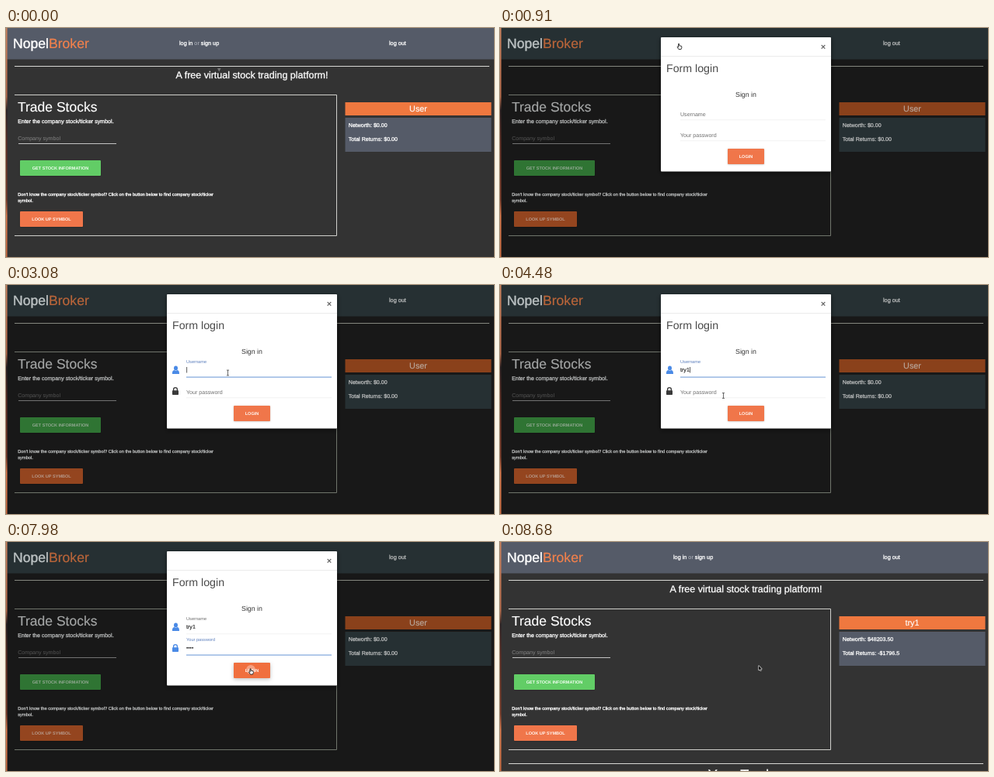
These frames come from a looping animation (628 px wide and 296 px high, 8.75 s). An HTML page with a canvas:

```html
<!DOCTYPE html>
<html lang="en">
<head>
<meta charset="utf-8">
<title>Stock trading login</title>
<style>
html, body { margin: 0; width: 100%; height: 100%; overflow: hidden; background: #333; }
canvas { display: block; width: 628px; height: 296px; }
</style>
</head>
<body>
<canvas id="stage"></canvas>
<script>
const LOOP = 8750, W = 628, H = 296;
const FONT = '"Liberation Sans", Arial, sans-serif';
const USER = 'try1';
const canvas = document.getElementById('stage');
const dpr = window.devicePixelRatio || 1;
canvas.width = W * dpr;
canvas.height = H * dpr;
const ctx = canvas.getContext('2d');
ctx.textRendering = 'geometricPrecision';

const lerp = (a, b, k) => a + (b - a) * k;
const ramp = (t, from, to) => Math.min(1, Math.max(0, (t - from) / (to - from)));
const easeOut = k => 1 - (1 - k) ** 2;
const easeInOut = k => k * k * (3 - 2 * k);

function mix(a, b, k) {
  const part = (hex, i) => parseInt(hex.substr(1 + i * 2, 2), 16);
  const rgb = [0, 1, 2].map(i => Math.round(lerp(part(a, i), part(b, i), k)));
  return `rgb(${rgb})`;
}

function box(x, y, w, h, color) {
  ctx.fillStyle = color;
  ctx.fillRect(x, y, w, h);
}

function text(str, x, y, size, color, { align = 'left', weight = 400, heavy = 0 } = {}) {
  ctx.font = `${weight} ${size}px ${FONT}`;
  ctx.textAlign = align;
  ctx.fillStyle = ctx.strokeStyle = color;
  ctx.fillText(str, x, y);
  if (heavy) {
    ctx.lineWidth = heavy;
    ctx.lineJoin = 'round';
    ctx.strokeText(str, x, y);
  }
  return ctx.measureText(str).width;
}

function button(label, x, y, w, color, textColor, lift = 0) {
  ctx.save();
  ctx.shadowColor = 'rgba(0,0,0,.25)';
  ctx.shadowBlur = 2 + lift * 3;
  ctx.shadowOffsetY = 0.5 + lift;
  ctx.fillStyle = color;
  ctx.beginPath();
  ctx.roundRect(x, y, w, 20, 1);
  ctx.fill();
  ctx.restore();
  text(label, x + w / 2, y + 12, 5.55, textColor, { align: 'center', weight: 700 });
}

// Page; dim runs from 0 (clear) to 1 (behind the dialog)
function drawPage(dim, loggedIn) {
  const tone = (a, b) => mix(a, b, dim);
  const ink = tone('#ffffff', '#b8baba');
  const orange = tone('#ef783f', '#8a411b');
  const slate = tone('#555b68', '#263033');
  const rule = tone('#d8d8d4', '#85877f');
  const small = { heavy: 0.3 };

  box(0, 0, W, H, tone('#333333', '#181818'));
  box(1, 0, W, 40.5, slate);
  const edge = ctx.createLinearGradient(0, 0, 0, H);
  edge.addColorStop(0, '#c9805c');
  edge.addColorStop(0.3, '#b4694a');
  edge.addColorStop(0.36, '#2a2022');
  edge.addColorStop(0.5, '#5c2c22');
  edge.addColorStop(0.75, '#7a3c2a');
  edge.addColorStop(0.82, '#d9794c');
  edge.addColorStop(1, '#c4683f');
  box(0, 0, 1.6, H, edge);

  const first = text('Nopel', 9, 26, 17.6, tone('#ffffff', '#bcc2c3'), { heavy: 0.4 });
  text('Broker', 9 + first, 26, 17.6, tone('#f2814c', '#b9653a'), { heavy: 0.2 });
  let x = 223;
  x += text('log in ', x, 22, 7.25, ink, small);
  x += text('or ', x, 22, 7.25, tone('#b9bdc6', '#7e8587'));
  text('sign up', x, 22, 7.25, ink, small);
  text('log out', 493, 22, 7.25, ink, small);

  box(11, 49, 611, 1, rule);
  text('A free virtual stock trading platform!', 316.5, 65, 12.5, ink, { align: 'center', heavy: 0.3 });

  // card, open on the left
  ctx.strokeStyle = tone('#d0d0cc', '#70756c');
  ctx.lineWidth = 1;
  ctx.beginPath();
  ctx.moveTo(11, 86.5);
  ctx.lineTo(425.5, 86.5);
  ctx.lineTo(425.5, 268.5);
  ctx.lineTo(11, 268.5);
  ctx.stroke();
  text('Trade Stocks', 15, 108, 17.5, tone('#ffffff', '#a4a6a6'), { heavy: 0.15 });
  text('Enter the company stock/ticker symbol.', 15.2, 123, 7.1, ink, small);
  text('Company symbol', 15.2, 144.5, 7.1, tone('#858585', '#555555'));
  box(16, 149, 126, 1, tone('#c4c4c4', '#737373'));
  button('GET STOCK INFORMATION', 18, 171, 104, tone('#62cd66', '#2f7433'), tone('#f4fff4', '#94a994'));
  text("Don't know the company stock/ticker symbol? Click on the button below to find company stock/ticker",
    15.2, 217, 5.7, ink, small);
  text('symbol.', 15.2, 225, 5.7, ink, small);
  button('LOOK UP SYMBOL', 18, 237, 81, tone('#f0764a', '#94451f'), tone('#fff6f0', '#b79a8b'));

  box(436.5, 96, 188, 17, orange);
  box(436.5, 116, 188, 44, slate);
  text(loggedIn ? USER : 'User', 530.5, 108, 10.8, tone('#ffffff', '#b9a79c'), { align: 'center', heavy: 0.15 });
  text(loggedIn ? 'Networth: $48203.50' : 'Networth: $0.00', 440.8, 128, 7.05, ink, small);
  text(loggedIn ? 'Total Returns: -$1796.5' : 'Total Returns: $0.00', 440.8, 145.5, 7.05, ink, small);

  if (loggedIn) {
    box(11, 286, 611, 1, rule);
    text('Your Trades', 316.5, 306.5, 18.2, ink, { align: 'center', heavy: 0.3 });
  }
}

function userIcon(x, y, color) {
  ctx.fillStyle = color;
  ctx.beginPath();
  ctx.ellipse(x, y - 2.6, 2.5, 2.9, 0, 0, 7);
  ctx.fill();
  ctx.beginPath();
  ctx.moveTo(x - 4.5, y + 5);
  ctx.bezierCurveTo(x - 4.7, y + 1.5, x - 3.5, y + 0.4, x - 2, y);
  ctx.quadraticCurveTo(x, y + 1.4, x + 2, y);
  ctx.bezierCurveTo(x + 3.5, y + 0.4, x + 4.7, y + 1.5, x + 4.5, y + 5);
  ctx.fill();
}

function lockIcon(x, y, color) {
  ctx.fillStyle = ctx.strokeStyle = color;
  ctx.beginPath();
  ctx.roundRect(x - 4, y - 0.8, 8, 5.8, 0.8);
  ctx.fill();
  ctx.lineWidth = 1.4;
  ctx.beginPath();
  ctx.moveTo(x - 2.4, y);
  ctx.lineTo(x - 2.4, y - 2);
  ctx.arc(x, y - 2, 2.4, Math.PI, 0);
  ctx.lineTo(x + 2.4, y);
  ctx.stroke();
}

// float: label raised 0..1, focus: 0..1, caret: shown or not
function field(label, y, float, focus, value, size, caret) {
  text(label, 232, lerp(y, y - 13, float), lerp(7.1, 5.65, float), mix('#6e6e6e', '#5c7fbd', focus));
  box(232, y + 4.5, 187, lerp(0.7, 1.2, focus), mix('#ececec', '#7fa6dc', focus));
  const w = value ? text(value, 232, y - 2, size, '#222222', { heavy: 0.15 }) : 0;
  if (caret) box(232.3 + w, y - 8, 0.8, 7.5, '#333333');
}

const USER_FOCUS = 2035, PASS_FOCUS = 5060;
const userKeys = [3990, 4060, 4165, 4270];
const passKeys = [6600, 6640, 6860, 7070];
const typed = (keys, t) => keys.filter(k => k <= t).length;

function caretOn(t, start, end, keys) {
  if (t < start || t >= end) return false;
  const last = Math.max(start, ...keys.filter(k => k <= t));
  return Math.floor((t - last) / 500) % 2 === 0;
}

function drawDialog(t, alpha, shift) {
  ctx.save();
  ctx.globalAlpha = alpha;
  ctx.translate(0, shift);
  ctx.save();
  ctx.shadowColor = 'rgba(0,0,0,.5)';
  ctx.shadowBlur = 6;
  ctx.shadowOffsetY = 2;
  ctx.fillStyle = '#fff';
  ctx.beginPath();
  ctx.roundRect(207, 12, 219, 173.5, 1);
  ctx.fill();
  ctx.restore();
  box(207, 36, 219, 0.8, '#e6e6e6');
  text('×', 416, 28, 11, '#666666', { align: 'center', weight: 700 });
  text('Form login', 214, 56.5, 14.2, '#4a4a4a');
  text('Sign in', 316.5, 89, 8.8, '#333333', { align: 'center' });

  const floatUser = easeOut(ramp(t, USER_FOCUS, USER_FOCUS + 230));
  const floatPass = easeOut(ramp(t, PASS_FOCUS, PASS_FOCUS + 230));
  const focusPass = ramp(t, PASS_FOCUS, PASS_FOCUS + 200);
  const focusUser = ramp(t, USER_FOCUS + 60, USER_FOCUS + 260) * (1 - focusPass);
  field('Username', 114, floatUser, focusUser, USER.slice(0, typed(userKeys, t)), 7.1,
    caretOn(t, USER_FOCUS, PASS_FOCUS, userKeys));
  field('Your password', 141, floatPass, focusPass, '•'.repeat(typed(passKeys, t)), 6.6,
    caretOn(t, PASS_FOCUS, 8300, passKeys));

  ctx.globalAlpha = alpha * ramp(t, 1080, 1330);
  userIcon(218.5, 110, mix('#3a3a3a', '#4a8ae6', ramp(t, USER_FOCUS - 30, USER_FOCUS + 200)));
  lockIcon(218, 137, mix('#3a3a3a', '#4a8ae6', focusPass));
  ctx.globalAlpha = alpha;

  const hover = ramp(t, 7650, 7850);
  button('LOGIN', 293, 156, 47, mix('#f0764a', '#f06f3e', hover), '#fff8f4', hover);
  const wave = ramp(t, 7920, 8200);
  if (wave > 0 && wave < 1) {
    ctx.save();
    ctx.beginPath();
    ctx.rect(293, 156, 47, 20);
    ctx.clip();
    ctx.fillStyle = `rgba(255,255,255,${0.45 * (1 - wave)})`;
    ctx.beginPath();
    ctx.arc(315, 165, 2 + 18 * wave, 0, 7);
    ctx.fill();
    ctx.restore();
  }
  ctx.restore();
}

function outline(points, x, y) {
  ctx.beginPath();
  points.forEach(([px, py]) => ctx.lineTo(x + px, y + py));
  ctx.closePath();
}

const ARROW = [[0, 0], [0, 5.6], [1.3, 4.4], [2.2, 6.4], [3, 6], [2.2, 4.1], [3.9, 4]];
const HAND = [[-1.4, -3.6], [-0.5, -3.6], [-0.3, -1.2], [2.6, -0.6], [2.9, 1.2], [2, 3.6],
  [-1, 3.6], [-3, 0.6], [-2.3, 0], [-1.4, 0.8]];

const cursors = {
  faint(x, y) {
    ctx.fillStyle = '#777';
    outline([[-2, -2], [2.5, -2], [0.3, 2.4]], x, y);
    ctx.fill();
  },
  arrow(x, y) {
    outline(ARROW, x, y);
    ctx.fillStyle = '#111';
    ctx.strokeStyle = '#eee';
    ctx.lineWidth = 1.1;
    ctx.stroke();
    ctx.fill();
  },
  hand(x, y) {
    outline(HAND, x, y);
    ctx.fillStyle = '#fff';
    ctx.strokeStyle = '#222';
    ctx.lineWidth = 0.9;
    ctx.fill();
    ctx.stroke();
  },
  beam(x, y) {
    ctx.strokeStyle = '#444';
    ctx.lineWidth = 0.8;
    ctx.beginPath();
    ctx.moveTo(x, y - 3.3);
    ctx.lineTo(x, y + 3.3);
    for (const s of [-3.4, 3.4]) {
      ctx.moveTo(x - 1.6, y + s);
      ctx.lineTo(x + 1.6, y + s);
    }
    ctx.stroke();
  }
};

// start, end, from x, y, to x, y
const moves = [
  [40, 630, 274, 54, 231, 24],
  [1060, 1400, 231, 24, 287.5, 118],
  [1640, 1750, 287.5, 118, 285.5, 113.5],
  [4290, 4480, 285.5, 113.5, 287.5, 143],
  [4480, 4620, 287.5, 143, 286.5, 139],
  [7100, 7840, 286.5, 139, 315.5, 167.5],
  [8400, 8660, 315.5, 167.5, 333, 160]
];

function drawCursor(t) {
  // the pointer hides while keys are pressed
  if ((t >= 3990 && t < 4290) || (t >= 6600 && t < 7100)) return;
  const [from, to, x0, y0, x1, y1] = moves.filter(m => m[0] <= t).pop() || moves[0];
  const k = easeInOut(ramp(t, from, to));
  const x = lerp(x0, x1, k), y = lerp(y0, y1, k);
  let shape = 'arrow';
  if (t < 70) shape = 'faint';
  else if ((t > 560 && t < 1120) || (t > 7600 && t < 8260)) shape = 'hand';
  else if (t > 1260 && t < 7350) shape = 'beam';
  cursors[shape](x, y);
}

function draw(t) {
  ctx.setTransform(dpr, 0, 0, dpr, 0, 0);
  // the backdrop leads on opening and trails on closing
  const dim = ramp(t, 790, 890) * (1 - ramp(t, 8110, 8260));
  const enter = easeOut(ramp(t, 800, 910)), leave = ramp(t, 8020, 8180);
  const shown = enter * (1 - leave);
  drawPage(dim, t >= 8180);
  if (shown > 0) drawDialog(t, shown, -24 * (1 - enter) - 24 * leave);
  drawCursor(t);
}

const start = performance.now();
function tick() {
  draw((performance.now() - start) % LOOP);
  requestAnimationFrame(tick);
}
tick();
</script>
</body>
</html>
```
